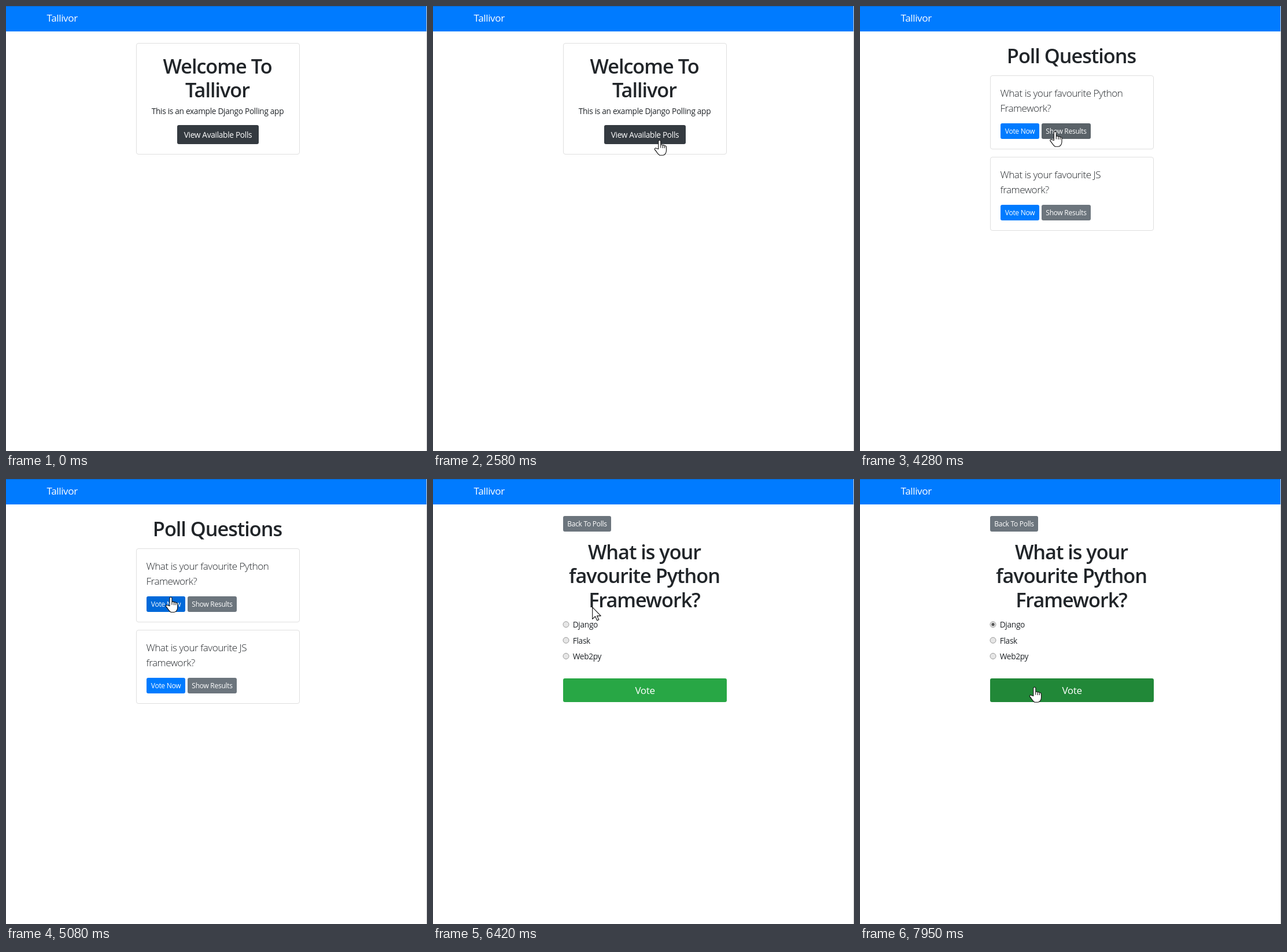
An HTML page for the animation above (8 s loop, 728 by 770 pixels).

```html
<!DOCTYPE html>
<html lang="en">
<head>
<meta charset="utf-8">
<title>Polling app</title>
<style>
  html, body { margin: 0; width: 100%; height: 100%; overflow: hidden; background: #fff; }
  svg { display: block; }
  text { font: 13.7px "Open Sans", "Noto Sans", sans-serif; letter-spacing: -.023em; fill: #212529; }
  .h { font-size: 34.3px; font-weight: 600; letter-spacing: -.03em; text-anchor: middle; }
  .lead { font-size: 17.1px; font-weight: 300; letter-spacing: -.028em; }
  .mid, .btn text { text-anchor: middle; }
  .brand, .btn text { fill: #fff; }
  .brand, .large text { font-size: 17.1px; }
  .small text { font-size: 12px; }
  .card { fill: #fff; stroke: #dfdfdf; }
  .dark { fill: #343a40; }
  .blue { fill: #007bff; } .hot .blue { fill: #0069d9; }
  .gray { fill: #6c757d; } .hot .gray { fill: #5a6268; }
  .green { fill: #28a745; } .hot .green { fill: #218838; }
  .focus .blue { fill: #0062cc; stroke: #80bdff; stroke-width: 5.2px; paint-order: stroke; }
  .radio { fill: #e6e6e6; stroke: #999; }
  #cursor path { fill: #fff; stroke: #111; stroke-width: 1.1; stroke-linejoin: round; }
</style>
</head>
<body>
<svg id="stage" width="728" height="770" viewBox="0 0 728 770"></svg>
<script>
const LOOP = 8000, TICK = 95, START = 70;
const PAGE_TIMES = [0, 3110, 6050];
const FOCUS_AT = 5720, CHECK_AT = 6950;

// Pointer tip: time, x, y
const PATH = [
  [70, 577, 675], [450, 510, 500], [830, 463, 376], [1020, 454.5, 336],
  [1300, 438, 305], [1680, 416, 274], [2100, 403, 252], [2540, 392, 233],
  [2910, 375, 208], [3110, 375, 208], [3500, 365, 217], [3890, 355, 222],
  [4250, 337.5, 218], [4780, 306, 214], [5200, 268, 198], [5620, 288, 213],
  [6050, 288, 213], [6640, 262, 230], [6900, 252, 250], [7180, 252.5, 250],
  [7450, 279, 324], [7860, 302, 361], [8000, 302, 361]
];

const text = (x, y, label, style = '') => `<text class="${style}" x="${x}" y="${y}">${label}</text>`;
const heading = (y, ...lines) => lines.map((line, i) => text(365.5, y + i * 41.1, line, 'h')).join('');
const card = (y, h) => `<rect class="card" x="225.5" y="${y}" width="282" height="${h}" rx="3.5"/>`;
const button = (x, y, w, h, label, color, size = '', drop = 4.2) =>
  `<g class="btn ${size}"><rect class="${color}" x="${x}" y="${y}" width="${w}" height="${h}" rx="3"/>` +
  text(x + w / 2, y + h / 2 + drop, label) + '</g>';

const poll = (y, ...lines) => card(y, 127) +
  lines.map((line, i) => text(242.5, y + 36.7 + i * 25.7, line, 'lead')).join('') +
  button(243, y + 82.5, 67, 27, 'Vote Now', 'blue', 'small') +
  button(314, y + 82.5, 85, 27, 'Show Results', 'gray', 'small');

const choice = (label, i) => {
  const y = 251.7 + i * 27.4;
  return `<circle class="radio" cx="230" cy="${y}" r="5"/>` + text(241.7, y + 5.6, label);
};

const pages = [
  card(64.5, 192) + heading(117, 'Welcome To', 'Tallivor') +
    text(366, 187, 'This is an example Django Polling app', 'mid') +
    button(296, 206, 141, 33, 'View Available Polls', 'dark', '', 5),
  heading(99, 'Poll Questions') +
    poll(120.5, 'What is your favourite Python', 'Framework?') +
    poll(261.5, 'What is your favourite JS', 'framework?'),
  button(225, 64, 83, 27, 'Back To Polls', 'gray', 'small') +
    heading(139.3, 'What is your', 'favourite Python', 'Framework?') +
    ['Django', 'Flask', 'Web2py'].map(choice).join('') +
    '<circle id="dot" cx="230" cy="251.7" r="2.6" fill="#555"/>' +
    button(225, 345, 283, 41, 'Vote', 'green', 'large', 6.5)
];

const stage = document.getElementById('stage');
stage.innerHTML = `
  <path fill="#007bff" d="M0 0H728V44H0Z"/>
  <path fill="#0b68cc" d="M0 0H728V1H0Z"/>
  <path fill="#ccc" d="M727 0h1V770h-1Z"/>
  ${text(70.5, 27, 'Tallivor', 'brand')}
  ${pages.map(p => `<g class="page">${p}</g>`).join('')}
  <g id="cursor">
    <path id="arrow" d="M.5 .5V21l4.8-4.6 3.3 7 3-1.3-3.2-6.6H15Z"/>
    <path id="hand" d="M-2.2 14.5V1.2a2 2 0 0 1 4 0V7.5q2-1.3 3.6.5 2-1 3.2.9 2.6-.6 2.9 2V17
      c0 4-2.5 8.3-6 8.3H0C-4 23-5 19-8.5 15.5c-1-1.8 1-3.3 2.8-2.2Z
      M1.8 7.5v5M5.4 8v5M8.6 9v4"/>
  </g>`;

const [cursor, arrow, hand, dot] = ['cursor', 'arrow', 'hand', 'dot'].map(id => document.getElementById(id));
const groups = [...stage.querySelectorAll('.page')];
const buttons = groups.map(g => [...g.querySelectorAll('.btn')].map(el => {
  const [x, y, w, h] = ['x', 'y', 'width', 'height'].map(k => +el.firstChild.getAttribute(k));
  return { el, holds: (px, py) => px >= x && px <= x + w && py >= y && py <= y + h };
}));
const show = (el, on) => { el.style.display = on ? '' : 'none'; };

function pointerAt(t) {
  const i = Math.max(1, PATH.findIndex(p => p[0] > t));
  const [t0, x0, y0] = PATH[i - 1], [t1, x1, y1] = PATH[i];
  const k = (t - t0) / (t1 - t0);
  return [x0 + (x1 - x0) * k, y0 + (y1 - y0) * k];
}

function draw(t) {
  const page = PAGE_TIMES.filter(p => p <= t).length - 1;
  // The pointer moves in small steps, as a screen recording does.
  const [x, y] = pointerAt(START + Math.max(0, Math.floor((t - START) / TICK)) * TICK);
  let over = false;
  groups.forEach((g, i) => show(g, i === page));
  for (const { el, holds } of buttons[page]) {
    const hot = t >= START && holds(x, y);
    el.classList.toggle('hot', hot);
    over ||= hot;
  }
  buttons[1][0].el.classList.toggle('focus', t >= FOCUS_AT);
  show(dot, t >= CHECK_AT);
  show(cursor, t >= START);
  show(hand, over);
  show(arrow, !over);
  cursor.setAttribute('transform', `translate(${x} ${y})`);
}

const begin = performance.now();
function tick() {
  draw((performance.now() - begin) % LOOP);
  requestAnimationFrame(tick);
}
tick();
</script>
</body>
</html>
```
